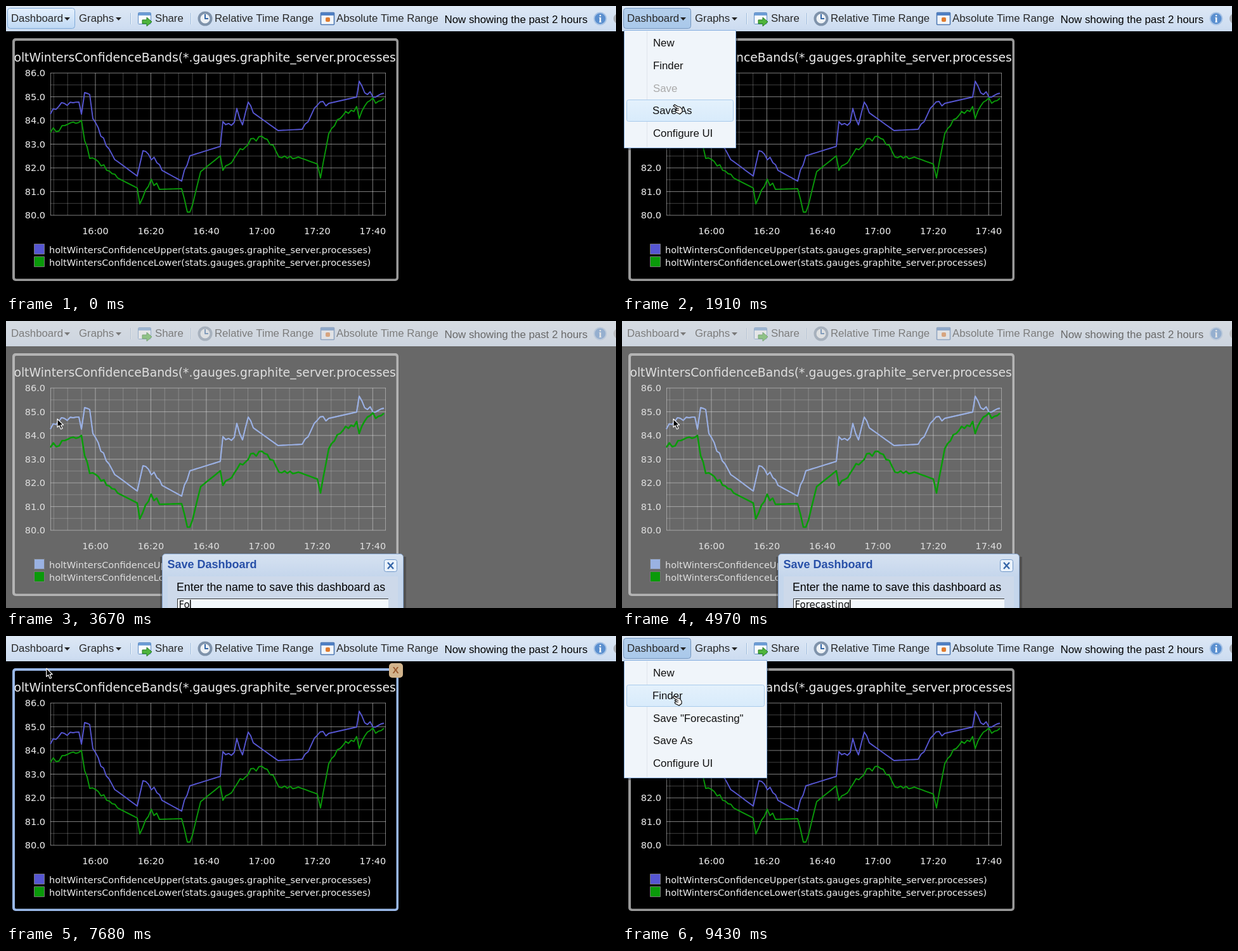
An HTML page with a canvas for the animation above (9.72 s loop, 962 px wide and 454 px high).

```html
<!DOCTYPE html>
<html lang="en">
<head>
<meta charset="utf-8">
<title>Dashboard</title>
<style>
  html, body { margin: 0; width: 100%; height: 100%; overflow: hidden; background: #000; }
  canvas { display: block; }
</style>
</head>
<body>
<canvas id="stage" width="962" height="454"></canvas>
<script>
const ctx = document.getElementById('stage').getContext('2d');
const LOOP = 9720;
const UI = '"Liberation Sans", Arial, sans-serif';
const PLOT = '"DejaVu Sans", sans-serif';
const PRESS = 120, OPEN = 340, FADE = 2620, DIALOG = 2660, SAVED = 5360, PRESS2 = 8060, OPEN2 = 8200;
const TYPED = 'Forecasting';
const KEYS = [3440, 3670, 3820, 3940, 4250, 4480, 4575, 4670, 4830, 4900, 4970];

// Joins a few turning points by minute-wide steps; short runs get seeded noise, long runs stay smooth.
function series(seed, ...turns) {
  const random = () => (seed = seed * 16807 % 2147483647) / 2147483647;
  const points = turns.slice(0, 2);
  for (let i = 2; i < turns.length; i += 2) {
    const [x0, y0, x1, y1] = turns.slice(i - 2, i + 2);
    const steps = Math.max(1, Math.round((x1 - x0) / 4.4));
    const noise = x1 - x0 < 30 ? 10 : 0;
    for (let s = 1; s <= steps; s++) {
      const p = s / steps;
      points.push(x0 + (x1 - x0) * p, y0 + (y1 - y0) * p + (p < 1 ? (random() - .5) * noise : 0));
    }
  }
  return points;
}
const UPPER = series(11, 70,171, 92,154, 115,152, 119,171, 124,137, 132,140, 137,178, 158,221, 176,246,
  207,269, 216,229, 238,248, 246,260, 277,277, 290,237, 338,222, 342,183, 360,184, 364,162, 373,188,
  382,152, 390,169, 429,197, 467,195, 491,157, 509,154, 553,144, 557,119, 570,140, 596,138);
const LOWER = series(29, 70,200, 93,189, 119,181, 124,213, 132,241, 150,253, 176,272, 207,288, 211,313,
  229,274, 242,290, 277,289, 286,326, 290,326, 307,262, 338,237, 342,260, 365,233, 386,210, 412,211,
  435,240, 461,239, 491,250, 496,272, 509,202, 527,178, 553,159, 557,178, 570,152, 596,146);

const rect = (x, y, w, h, fill) => { ctx.fillStyle = fill; ctx.fillRect(x, y, w, h); };

function text(str, x, y, size, fill, family = UI, align = 'left', weight = '') {
  ctx.font = `${weight} ${size}px ${family}`;
  ctx.textAlign = align;
  ctx.fillStyle = fill;
  ctx.fillText(str, x, y);
}

function paint(fill, stroke, width = 1) {
  if (fill) { ctx.fillStyle = fill; ctx.fill(); }
  if (stroke) { ctx.strokeStyle = stroke; ctx.lineWidth = width; ctx.stroke(); }
}

function box(x, y, w, h, r, fill, stroke, width) {
  ctx.beginPath();
  ctx.roundRect(x, y, w, h, r);
  paint(fill, stroke, width);
}

function circle(x, y, r, fill, stroke, width) {
  ctx.beginPath();
  ctx.arc(x, y, r, 0, 7);
  paint(fill, stroke, width);
}

function path(points, stroke, width, fill) {
  ctx.beginPath();
  for (let i = 0; i < points.length; i += 2) ctx.lineTo(points[i], points[i + 1]);
  if (fill) ctx.closePath();
  paint(fill, stroke, width);
}

function vertical(y0, y1, top, bottom) {
  const g = ctx.createLinearGradient(0, y0, 0, y1);
  g.addColorStop(0, top);
  g.addColorStop(1, bottom);
  return g;
}

function toolbar(button) {
  rect(0, 0, 962, 40, vertical(0, 40, '#dde8f5', '#cbdbf0'));
  if (button === 'hover') box(2.5, 3.5, 106, 32, 4, vertical(3, 36, '#e6f1fd', '#bed8f4'), '#7ea9d8');
  if (button === 'pressed') box(2.5, 3.5, 106, 32, 4, vertical(3, 36, '#b4cfec', '#a9c8ea'), '#7396c0');
  const labels = { Dashboard: 8, Graphs: 115, Share: 235, 'Relative Time Range': 329, 'Absolute Time Range': 521 };
  for (const label in labels) text(label, labels[label], 25, 16.8, '#282828');
  text('Now showing the past 2 hours', 691.5, 27, 16.85, '#000');
  for (const x of [92, 173]) path([x, 18, x + 9, 18, x + 4.5, 23], null, 0, '#222');
  for (const x of [196, 291]) {
    rect(x, 11, 1, 18, '#9fbcdc');
    rect(x + 1, 11, 1, 18, '#f4f8fc');
  }
  // share
  box(208.5, 10.5, 20, 18, 1, '#fafcff', '#5d8cc4');
  rect(209, 11, 19, 4, '#6d9ed6');
  path([215, 22, 222, 22, 222, 18, 230, 25, 222, 32, 222, 28, 215, 28], '#247a20', 1, '#4fb53c');
  // clock
  circle(314, 20, 9.5, '#eef2f6', '#7f93ab', 4);
  path([314, 13, 314, 20, 319, 20], '#3568a8', 2);
  // calendar
  box(496.5, 10.5, 21, 19, 1, '#f2f6fb', '#4f7ab4', 1.6);
  rect(497, 11, 20, 4, '#4f80c4');
  box(504, 18, 7, 7, 2, '#e07b30');
  // info
  circle(937, 20, 9.5, '#5a8fcf', '#a9c4e6', 2);
  text('i', 937, 26, 17, '#fff', '"Liberation Serif", serif', 'center', 'bold');
  circle(966, 20, 6, null, '#a9adb3', 4);
}

function curves(upper, lower, width) {
  ctx.lineJoin = 'round';
  path(UPPER, upper, 1.9);
  path(LOWER, lower, width);
  box(44.5, 376.5, 16, 16, 0, upper, '#777');
  box(44.5, 396.5, 16, 16, 0, lower, '#777');
}

function graph(hover) {
  box(10, 51, 609, 384, 5, hover ? '#99b8e8' : '#999');
  box(14, 55, 601.5, 376.5, 2, '#000');
  ctx.save();
  ctx.beginPath();
  ctx.rect(13.5, 55, 602, 376);
  ctx.clip();
  text('holtWintersConfidenceBands(*.gauges.graphite_server.processes)', .5, 88, 18.8, '#eee', PLOT);
  ctx.restore();

  const major = 'rgba(255,255,255,.45)', minor = 'rgba(255,255,255,.23)';
  for (let i = 0; i <= 12; i++) {
    const y = 106 + i * 18.75;
    rect(70, y - .5, 529, 1.1, i % 2 ? minor : major);
    if (i % 2 === 0) text((86 - i / 2).toFixed(1), 62, y + 5, 14.5, '#f0f0f0', PLOT, 'right');
  }
  for (let i = -3; i <= 20; i++) {
    const x = 140.9 + i * 21.87;
    rect(x - .5, 106, 1.1, 225, i % 4 ? minor : major);
    if (i >= 0 && i % 4 === 0) {
      const minutes = 960 + i * 5;
      const label = (minutes / 60 | 0) + ':' + String(minutes % 60).padStart(2, '0');
      text(label, x, 361, 14.4, '#f0f0f0', PLOT, 'center');
    }
  }
  rect(70, 106, 1, 225, major);
  rect(598, 106, 1, 225, major);
  ['Upper', 'Lower'].forEach((name, i) =>
    text(`holtWintersConfidence${name}(stats.gauges.graphite_server.processes)`, 68, 391 + i * 19.5, 14.53, '#f0f0f0', PLOT));
  curves('#5656d2', '#0a9a0a', 1.9);

  if (hover) {
    box(604, 43, 22, 23, 5, '#d2b48c');
    text('X', 614.5, 59, 15, '#9a5a30', UI, 'center', 'bold');
  }
}

function menu(saved, active) {
  const width = saved ? 225 : 176;
  const items = ['New', 'Finder', saved ? 'Save "Forecasting"' : 'Save', 'Save As', 'Configure UI'];
  rect(4, 43, width + 3, 185, 'rgba(0,0,0,.3)');
  box(3.5, 38.5, width, 186, 0, '#f0f5fa', '#86afe0');
  rect(39, 40, 1, 183, '#dfe5ec');
  items.forEach((label, i) => {
    const on = i === active, y = Math.round(58 + i * 35.8);
    if (on) box(7.5, y - 16.5, width - 8, 34, 3, vertical(y - 17, y + 18, '#e4f1fc', '#d8ebfb'), '#a9cbec');
    text(label, on ? 48 : 49, y + 6, 16.8, i === 2 && !saved ? '#aaa' : '#111');
  });
}

function dialog(fading, typed) {
  if (fading) rect(244, 376, 387, 78, 'rgba(0,0,0,.25)');
  else {
    rect(243, 373, 388, 81, 'rgba(0,0,0,.22)');
    box(246.5, 368.5, 380, 100, 5, vertical(368, 404, '#d6e2f1', '#c5d6ec'), '#86a5cf');
  }
  text('Save Dashboard', 254.5, 391, 18, '#2850a8', UI, 'left', 'bold');
  box(596.5, 377.5, 20, 19, 3, '#eaf2fb', '#6f97c8');
  path([602, 382, 611, 392], '#3565a8', 2.4);
  path([611, 382, 602, 392], '#3565a8', 2.4);
  rect(255, 404, 363, 50, '#cdd9ea');
  text('Enter the name to save this dashboard as', 269, 427, 17.8, '#000');
  rect(270, 439, 333, 15, '#333');
  rect(271, 440, 332, 14, '#f3f8fc');
  if (fading) return;
  text(typed, 272.5, 454, 15, '#111', PLOT);
  rect(Math.round(272.5 + ctx.measureText(typed).width), 441, 1.5, 13, '#000');
}

function cursor({ x, y, hand }) {
  ctx.save();
  ctx.translate(x, y);
  ctx.lineJoin = 'round';
  if (hand) {
    path([0, 2, 2, 0, 7, 3, 11, 4, 14, 8, 14, 12, 10, 15, 4, 12, 3, 10, 6, 9, 3, 7, 6, 6], '#111', 1.2, '#fff');
    path([6, 6, 9, 7], '#111', 1);
    path([6, 9, 9, 9.5], '#111', 1);
  } else {
    path([0, 0, 0, 13, 3, 10.5, 5.5, 16, 8, 15, 5.5, 9.5, 9.5, 9.5], '#fff', 1.2, '#000');
  }
  ctx.restore();
}

const progress = (t, from, to) => Math.min(1, Math.max(0, (t - from) / (to - from)));
const smooth = p => p * p * (3 - 2 * p);
const easeOut = p => p * (2 - p);
const between = (x0, y0, x1, y1, p, hand) => ({ x: x0 + (x1 - x0) * p, y: y0 + (y1 - y0) * p, hand });

function pointer(t) {
  if (t < 980) return null;
  if (t < DIALOG) return between(62, 37, 81, 156, smooth(progress(t, 980, 1910)), true);
  if (t < 6230) return { x: 81, y: 155 };
  if (t < 7240) {
    const a = -1.08 - progress(t, 6230, 7200) * 2 * Math.PI;
    return { x: 69.5 + 24 * Math.cos(a), y: 168 + 14 * Math.sin(a) };
  }
  if (t < 8680) {
    const p = between(81, 155, 59, 23, easeOut(progress(t, 7240, PRESS2)));
    p.hand = p.y < 37;
    return p;
  }
  return between(59, 23, 80, 95, smooth(progress(t, 8680, 9430)), true);
}

function draw(t) {
  const tip = pointer(t);
  const masked = t >= FADE && t < SAVED;
  const pressed = (t >= PRESS && t < DIALOG) || t >= PRESS2;
  const overButton = t < PRESS || (t > 7240 && tip.y < 37);
  const saved = t >= OPEN2;

  rect(0, 0, 962, 454, '#000');
  toolbar(pressed ? 'pressed' : overButton ? 'hover' : '');
  graph(t >= SAVED && t < PRESS2 && tip.y > 48);
  if (masked) {
    rect(0, 0, 962, 454, 'rgba(208,208,208,.5)');
    curves('#9ab2e2', '#0a9a0a', 2.6);
    dialog(t < DIALOG, TYPED.slice(0, KEYS.filter(k => k <= t).length));
  }
  if ((t >= OPEN && t < DIALOG) || saved) {
    const row = tip && tip.y >= 41 ? Math.floor((tip.y - 41) / 35.8) : -1;
    menu(saved, row === 2 && !saved ? -1 : row);
  }
  if (tip) cursor(tip);
}

const start = performance.now();
function tick() {
  draw((performance.now() - start) % LOOP);
  requestAnimationFrame(tick);
}
tick();
</script>
</body>
</html>
```
